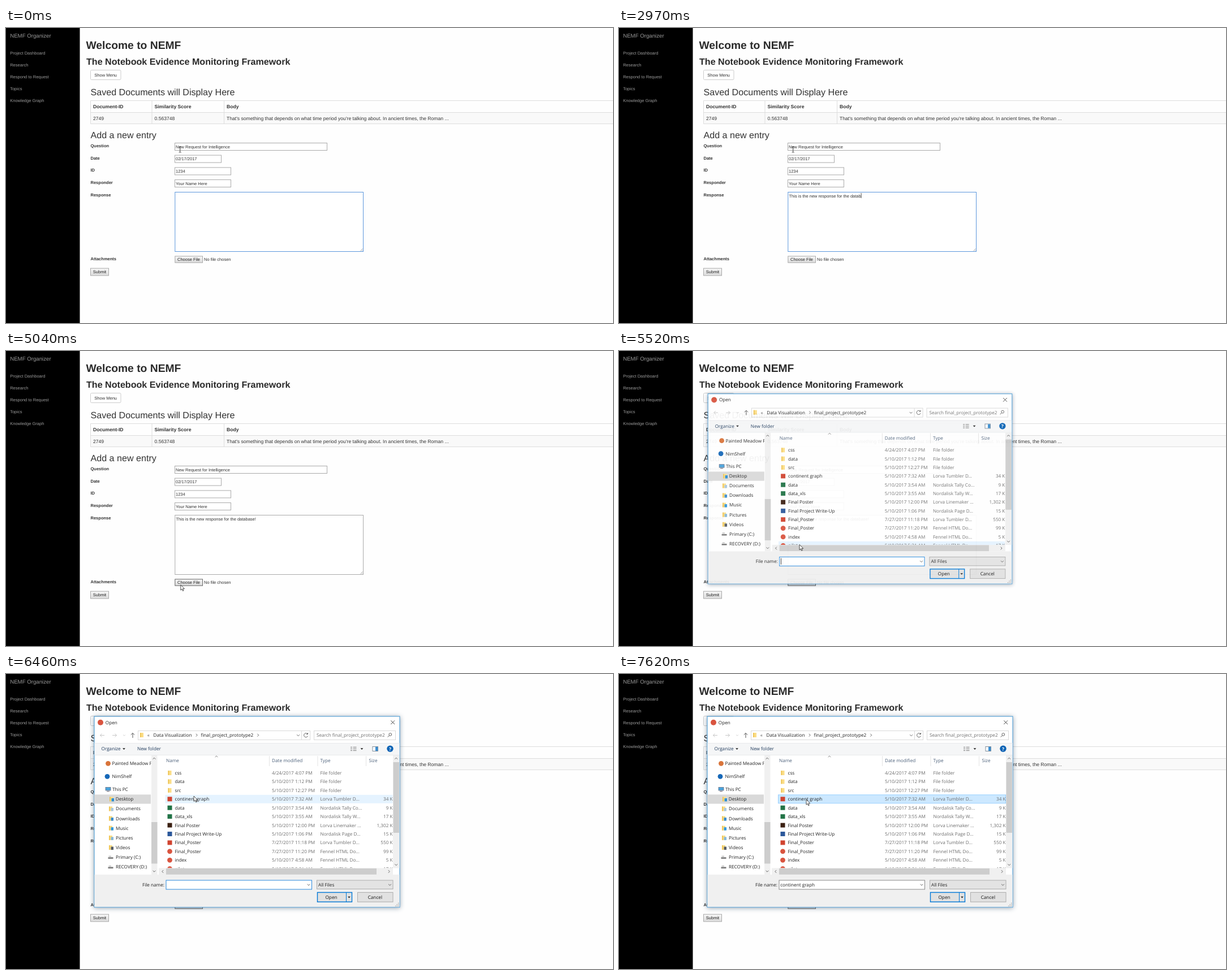
Animation of 1073 by 522 pixels, one loop 8 s. Source, as an HTML page:

```html
<!DOCTYPE html>
<html lang="en">
<head>
<meta charset="utf-8">
<title>Add a new entry</title>
<style>
  html, body { margin: 0; width: 100%; height: 100%; overflow: hidden; background: #fefefe; }
  svg { display: block; width: 100%; height: 100%; text-rendering: geometricPrecision; font-family: "Liberation Sans", Arial, sans-serif; }
  #dialog { font-family: "Open Sans", "Noto Sans", sans-serif; }
  .shadow { filter: drop-shadow(0 1px 4px rgba(20, 50, 80, .45)); }
  text { white-space: pre; }
</style>
</head>
<body>
<svg id="stage" viewBox="0 0 1073 522">
  <defs>
    <linearGradient id="face" x2="0" y2="1"><stop stop-color="#f7f7f7"/><stop offset="1" stop-color="#dcdcdc"/></linearGradient>
    <clipPath id="navClip"><rect x="156" y="144" width="100.5" height="211"/></clipPath>
    <clipPath id="listClip"><rect x="270" y="163" width="414" height="180.5"/></clipPath>
  </defs>
  <g id="page"></g>
  <g id="dialog"></g>
  <path id="beam" d="M-2-5H-.6L0-4.5 .6-5H2M0-4.5V4.5M-2 5H-.6L0 4.5 .6 5H2" fill="none" stroke="#333" stroke-width=".9"/>
  <path id="arrow" d="M0 0V9.4L2.2 7.4 3.7 10.8 5.2 10.2 3.8 6.9H6.7Z" fill="#fff" stroke="#222" stroke-width=".8"/>
</svg>
<script>
const $ = id => document.getElementById(id);

// y is the middle of the capitals
const text = (x, y, str, size, fill = '#333', extra = '') =>
  `<text x="${x}" y="${y + size * .36}" font-size="${size}" fill="${fill}" ${extra}>${str}</text>`;
const box = (x1, y1, x2, y2, fill, stroke = 'none', extra = '') =>
  `<rect x="${x1}" y="${y1}" width="${x2 - x1}" height="${y2 - y1}" fill="${fill}" stroke="${stroke}" ${extra}/>`;
const line = (d, stroke, width = 1) => `<path d="${d}" fill="none" stroke="${stroke}" stroke-width="${width}"/>`;
const dot = (x, y, r, fill) => `<circle cx="${x}" cy="${y}" r="${r}" fill="${fill}"/>`;
const bold = 'font-weight="bold"', middle = 'text-anchor="middle"', end = 'text-anchor="end"';

function pageMarkup() {
  const small = 7.52, cell = 8.6, heading = 16.1;
  const menu = ['Project Dashboard', 'Research', 'Respond to Request', 'Topics', 'Knowledge Graph'];
  const labels = [['Question', 208.5], ['Date', 230], ['ID', 251.7], ['Responder', 273.3], ['Response', 295], ['Attachments', 408.5]];
  const inputs = [['New Request for Intelligence', 567.5, 210], ['02/17/2017', 380.5, 231.6], ['1234', 397.5, 253.4], ['Your Name Here', 397.5, 275]];
  const columns = [[154, 'Document-ID', '2749'], [262.5, 'Similarity Score', '0.563748'],
    [390, 'Body', "That's something that depends on what time period you're talking about. In ancient times, the Roman ..."]];
  return box(0, 0, 130.5, 522, '#000')
    + text(7.2, 14, 'NEMF Organizer', 9.66, '#999')
    + menu.map((m, i) => text(7.2, 43.8 + i * 21.2, m, small, '#999')).join('')
    + text(141.5, 30, 'Welcome to NEMF', 19.3, '#2b2b2b', bold)
    + text(142, 59.7, 'The Notebook Evidence Monitoring Framework', heading, '#2b2b2b', bold)
    + box(149.5, 74.5, 203, 91.5, '#fff', '#ccc', 'rx="2"') + text(176.2, 83.2, 'Show Menu', small, '#333', middle)
    + text(149.5, 113.7, 'Saved Documents will Display Here', heading)
    + box(149.5, 149.5, 1075, 169.5, '#f9f9f9')
    + line('M1073 128.5H149.5V169.5H1073M149.5 149.5H1073M258 128.5V169.5M385.5 128.5V169.5', '#ddd')
    + columns.map(([x, head, body]) => text(x, 139, head, cell, '#333', bold) + text(x, 159.6, body, cell)).join('')
    + text(149.5, 189, 'Add a new entry', heading)
    + labels.map(([s, y]) => text(149.5, y, s, small, '#333', bold)).join('')
    + inputs.map(([s, right, y]) => box(298.5, y - 6.5, right, y + 6.5, '#fff', '#aaa') + text(300, y, s, 7.5)).join('')
    + box(298.8, 290.5, 631.5, 395.5, '#fff', '#aaa', 'id="area"')
    + line('M626.5 394.5L630.5 390.5M629 394.5L630.5 393', '#888', .7)
    + text(300.5, 296.8, '', 7.5, '#333', 'id="typed"')
    + box(0, 292, .8, 301, '#222', 'none', 'id="caret"')
    + box(298.8, 403.8, 347.5, 415.2, 'url(#face)', '#aaa', 'id="choose"')
    + text(323, 409.5, 'Choose File', 7.5, '#222', middle) + text(350, 409, 'No file chosen', 7.5)
    + box(149.5, 425.2, 181.5, 438, 'url(#face)', '#aaa') + text(165.5, 431.5, 'Submit', 7.5, '#222', middle);
}

const sizeUi = 8.2, rowTop = 175, rowStep = 15.43;
const ui = (x, y, str, fill = '#222', extra) => text(x, y, str, sizeUi, fill, extra);
const chevron = (x, y, dx, dy, color = '#555', r = 2.4) => {
  const h = r / 2;
  return line(dx ? `M${x - h * dx} ${y - r}L${x + h * dx} ${y}L${x - h * dx} ${y + r}`
                 : `M${x - r} ${y - h * dy}L${x} ${y + h * dy}L${x + r} ${y - h * dy}`, color, .9);
};
const triangle = (x, y) => `<path d="M${x - 2.4} ${y - 1.2}h4.8l-2.4 2.6z" fill="#222"/>`;
const folder = (x, y) => box(x - 3, y - 4, x + 3, y + 4, '#fbdd86') + box(x - 3, y - 4, x - 1.4, y + 4, '#ecc14f');
const square = (x, y, color) => box(x - 4, y - 4, x + 4, y + 4, color);
const drive = (x, y) => box(x - 4.5, y, x + 4.5, y + 2.6, '#777') + box(x - 3.5, y - 2.5, x + 1, y - 1, '#bbb');
const screen = (x, y) => box(x - 4, y - 3.5, x + 5, y + 2, '#49a3dc', '#667', 'stroke-width=".7"') + box(x - 2, y + 3, x + 3, y + 4, '#667');
const tagged = color => (x, y) => folder(x - 1, y) + box(x - .5, y - 1.5, x + 4, y + 4, color);
const mark = color => (x, y) => dot(x, y, 4.4, color);
const block = color => (x, y) => square(x, y, color);

function navMarkup() {
  const items = [
    [158.3, 180.5, 187.5, 'Painted Meadow Files', mark('#d9743a')], [181.3, 179, 187.5, 'NimShelf', mark('#1668b8')],
    [204, 180, 188, 'This PC', screen], [221.4, 187, 193.7, 'Desktop', tagged('#2b8fd6')],
    [238.5, 186, 194, 'Documents', tagged('#a9c7de')], [255.6, 186, 194, 'Downloads', tagged('#3b8ed0')],
    [272.7, 186, 194, 'Music', tagged('#3399dd')], [289.9, 186, 194, 'Pictures', tagged('#86b8d8')],
    [307.1, 186, 194, 'Videos', tagged('#555d68')], [324.3, 185, 194, 'Primary (C:)', drive], [341.5, 185, 194, 'RECOVERY (D:)', drive]];
  return '<g clip-path="url(#navClip)">' + box(156, 213.3, 256, 229.6, '#d9d9d9')
    + items.map(([y, iconX, x, name, icon]) => icon(iconX, y) + ui(x, y, name)).join('') + '</g>'
    + box(257, 144, 267.5, 355, '#f0f0f0') + box(257, 262, 267.5, 335.5, '#cdcdcd')
    + chevron(262, 149.5, 0, -1) + chevron(262, 349, 0, 1);
}

function listMarkup() {
  const pdf = block('#d0432f'), web = mark('#d9543f');
  const files = [
    ['css', '4/24/2017 4:07 PM', 'File folder', '', folder], ['data', '5/10/2017 1:12 PM', 'File folder', '', folder],
    ['src', '5/10/2017 12:27 PM', 'File folder', '', folder],
    ['continent graph', '5/10/2017 7:32 AM', 'Lorva Tumbler D...', '34 K', pdf],
    ['data', '5/10/2017 3:54 AM', 'Nordalisk Tally Co...', '9 K', block('#217346')],
    ['data_xls', '5/10/2017 3:55 AM', 'Nordalisk Tally W...', '17 K', block('#217346')],
    ['Final Poster', '5/10/2017 12:00 PM', 'Lorva Linemaker ...', '1,302 K', block('#3b2012')],
    ['Final Project Write-Up', '5/10/2017 1:06 PM', 'Nordalisk Page D...', '15 K', block('#2b579a')],
    ['Final_Poster', '7/27/2017 11:18 PM', 'Lorva Tumbler D...', '550 K', pdf],
    ['Final_Poster', '7/27/2017 11:20 PM', 'Fennel HTML Do...', '99 K', web],
    ['index', '5/10/2017 4:58 AM', 'Fennel HTML Do...', '5 K', web],
    ['pilot', '5/10/2017 5:31 AM', 'Fennel HTML Do...', '17 K', web]];
  const heads = [[283, 'Name'], [470, 'Date modified'], [555.5, 'Type'], [641.5, 'Size']];
  return heads.map(([x, s]) => ui(x, 153.5, s, '#4c607a')).join('')
    + line('M465.5 145V163M551 145V163M636.5 145V163', '#e3e3e3') + chevron(372, 146, 0, -1, '#777')
    + '<g clip-path="url(#listClip)">' + box(281.5, 0, 683.5, rowStep - .5, '#e5f3ff', 'none', 'id="hover"')
    + files.map(([name, date, type, size, icon], i) => {
      const y = rowTop + i * rowStep;
      return icon(289.5, y) + ui(298.5, y, name) + ui(470, y, date, '#6d6d6d')
        + ui(555.5, y, type, '#6d6d6d') + ui(683.5, y, size, '#6d6d6d', end);
    }).join('') + '</g>'
    + box(684, 144, 695.5, 343.5, '#f0f0f0') + box(684.5, 156, 695, 281, '#cdcdcd')
    + chevron(689.7, 149.5, 0, -1) + chevron(689.7, 337.5, 0, 1)
    + box(270, 343.5, 684, 355, '#f0f0f0') + box(283, 344, 655, 354.8, '#cdcdcd')
    + chevron(277, 349.5, -1, 0) + chevron(677, 349.5, 1, 0);
}

function dialogMarkup() {
  const gray = '#c8c8c8', dark = '#555';
  return box(156, 75, 696, 412.7, '#fff', '#4097d4', 'class="shadow"')
    + dot(167, 85.7, 5, '#d9543f') + ui(175.8, 85.7, 'Open') + line('M680.3 82.3L687 89M687 82.3L680.3 89', '#333', .9)
    // address row
    + line('M174 108.5H166.5M169.5 105.5L166.5 108.5L169.5 111.5M188 108.5H195.5M192.5 105.5L195.5 108.5L192.5 111.5', gray)
    + chevron(209, 108.5, 0, 1, gray, 1.8) + line('M224 113V104.5M220.8 107.7L224 104.5L227.2 107.7', dark)
    + box(233.5, 100.5, 537.5, 116.5, '#fff', '#d9d9d9') + line('M522.5 100.5V116.5', '#d9d9d9')
    + folder(240, 108) + ui(249.8, 108, '«', dark) + ui(260.5, 108.2, 'Data Visualization') + chevron(337, 108.2, 1, 0)
    + ui(344.5, 108.2, 'final_project_prototype2') + `<g id="crumb">${chevron(445.5, 108.2, 1, 0)}</g>`
    + chevron(516.5, 108.5, 0, 1) + line('M533 106A3.6 3.6 0 1 0 533.6 109.5M533.5 104V106.5H531', dark, .9)
    + box(544.5, 100.5, 688.5, 116.5, '#fff', '#d9d9d9') + ui(549, 108.2, 'Search final_project_prototype2', '#6d6d6d')
    + '<circle cx="679.3" cy="107" r="2.4" fill="none" stroke="#555" stroke-width=".9"/>' + line('M677.6 108.8L674.8 111.6', dark)
    // toolbar
    + box(156.5, 122, 695.5, 143, '#f5f6f7') + line('M156.5 122.5H695.5M156.5 143.5H695.5', '#e8eaec')
    + ui(168.5, 132.5, 'Organize', '#1e395b') + triangle(208.5, 132.5) + ui(232, 132.5, 'New folder', '#1e395b')
    + line('M609 129.5H612M609 132.5H612M609 135.5H612M613.5 129.5H619.5M613.5 132.5H619.5M613.5 135.5H619.5', '#777', 1.2) + triangle(629, 132.5)
    + box(648, 128.5, 657.5, 136.5, '#fff', '#678', 'stroke-width=".8"') + box(653, 129, 657.2, 136, '#3b8ed0')
    + dot(679, 132.3, 5.7, '#0a63b5') + text(679, 132.5, '?', 8.5, '#fff', `${bold} ${middle}`)
    + navMarkup() + listMarkup()
    // footer
    + box(156.5, 355, 695.5, 412.2, '#f0f0f0')
    + ui(280, 373, 'File name:', '#222', end) + box(283, 365, 540.5, 381, '#fff', '#0078d7', 'id="nameBox"')
    + ui(285.2, 373, '', '#222', 'id="fileName"') + box(285.3, 367, 286.2, 378.5, '#222', 'none', 'id="nameCaret"') + chevron(535, 373, 0, 1)
    + box(549.5, 365, 684, 380.5, '#e3e3e3', '#adadad') + ui(552, 373, 'All Files') + chevron(678.5, 373, 0, 1)
    + box(550.5, 386.5, 611.5, 403.3, '#e1e1e1', '#0078d7', 'stroke-width="1.4"') + line('M601.5 386.5V403.3', '#0078d7')
    + ui(575, 394.7, 'Open', '#111', middle) + triangle(606.5, 395)
    + box(621.5, 386.5, 684, 403.3, '#e1e1e1', '#adadad') + ui(652.3, 394.7, 'Cancel', '#111', middle)
    + line('M688 410.5H689.3M690.5 410.5H691.8M693 410.5H694.3M690.5 408H691.8M693 408H694.3M693 405.5H694.3', '#aaa', 1.3);
}

$('page').innerHTML = pageMarkup();
$('dialog').innerHTML = dialogMarkup();

const message = 'This is the new response for the database!';
// start, end, steps, characters shown at the end
const typing = [[80, 480, 6, 7], [640, 710, 2, 10], [860, 1640, 11, 23], [1720, 2500, 11, 34],
  [2650, 2800, 3, 37], [2970, 3200, 4, 41], [3430, 3430, 1, 42]];
// start, end, steps, x, y at the end
const moves = [[3980, 4730, 11, 306, 440], [4810, 5040, 4, 308.8, 413.8], [5360, 5520, 3, 319, 342.5],
  [5980, 6460, 7, 332, 216], [6990, 7620, 9, 331, 222]];

// Stepped progress: the first of n steps lands at start, the last at end
function progress(t, start, end, n) {
  if (t < start) return 0;
  if (t >= end) return 1;
  return (Math.floor((t - start) / (end - start) * (n - 1) + 1e-6) + 1) / n;
}
const between = (t, a, b) => t >= a && t < b;
const show = (id, on) => $(id).setAttribute('visibility', on ? 'inherit' : 'hidden');
const set = (id, attrs) => { for (const k in attrs) $(id).setAttribute(k, attrs[k]); };

function draw(t) {
  let count = 0;
  for (const [start, stop, n, chars] of typing) count += (chars - count) * progress(t, start, stop, n);
  $('typed').textContent = message.slice(0, Math.round(count));
  set('caret', { x: 300.5 + $('typed').getComputedTextLength() });
  show('caret', between(t, 80, 3980) || between(t, 4510, 4890));

  const focused = t < 4890;
  set('area', { stroke: focused ? '#5c97dc' : '#aaa' });
  set('choose', { stroke: t < 4810 ? '#aaa' : '#666' });

  let x = 307.7, y = 215;
  for (const [start, stop, n, toX, toY] of moves) {
    const p = progress(t, start, stop, n), eased = p * p * (3 - 2 * p);
    x += (toX - x) * eased;
    y += (toY - y) * eased;
  }
  const opened = t >= 5360, beam = !opened && y < 396;
  show('beam', beam);
  show('arrow', !beam);
  set(beam ? 'beam' : 'arrow', { transform: `translate(${x} ${y})` });

  const rest = (1 - progress(t, 5360, 5600, 4)) ** 2;
  show('dialog', opened);
  set('dialog', { opacity: 1 - rest, transform: `translate(426 244) scale(${1 - .072 * rest}) translate(-426 -244)` });
  show('crumb', t >= 5600);

  const selected = t >= 7070, row = Math.min(11, Math.round((y - rowTop) / rowStep));
  set('hover', { y: rowTop + (row - .5) * rowStep + .25, fill: selected ? '#cce8ff' : '#e5f3ff', stroke: selected ? '#99d1ff' : 'none' });
  $('fileName').textContent = selected ? 'continent graph' : '';
  set('nameBox', { stroke: selected ? '#8a8a8a' : '#2a8add' });
  show('nameCaret', between(t, 5360, 5980) || between(t, 6530, 7070));
}

function tick() {
  draw(performance.now() % 8000);
  requestAnimationFrame(tick);
}
tick();
</script>
</body>
</html>
```
